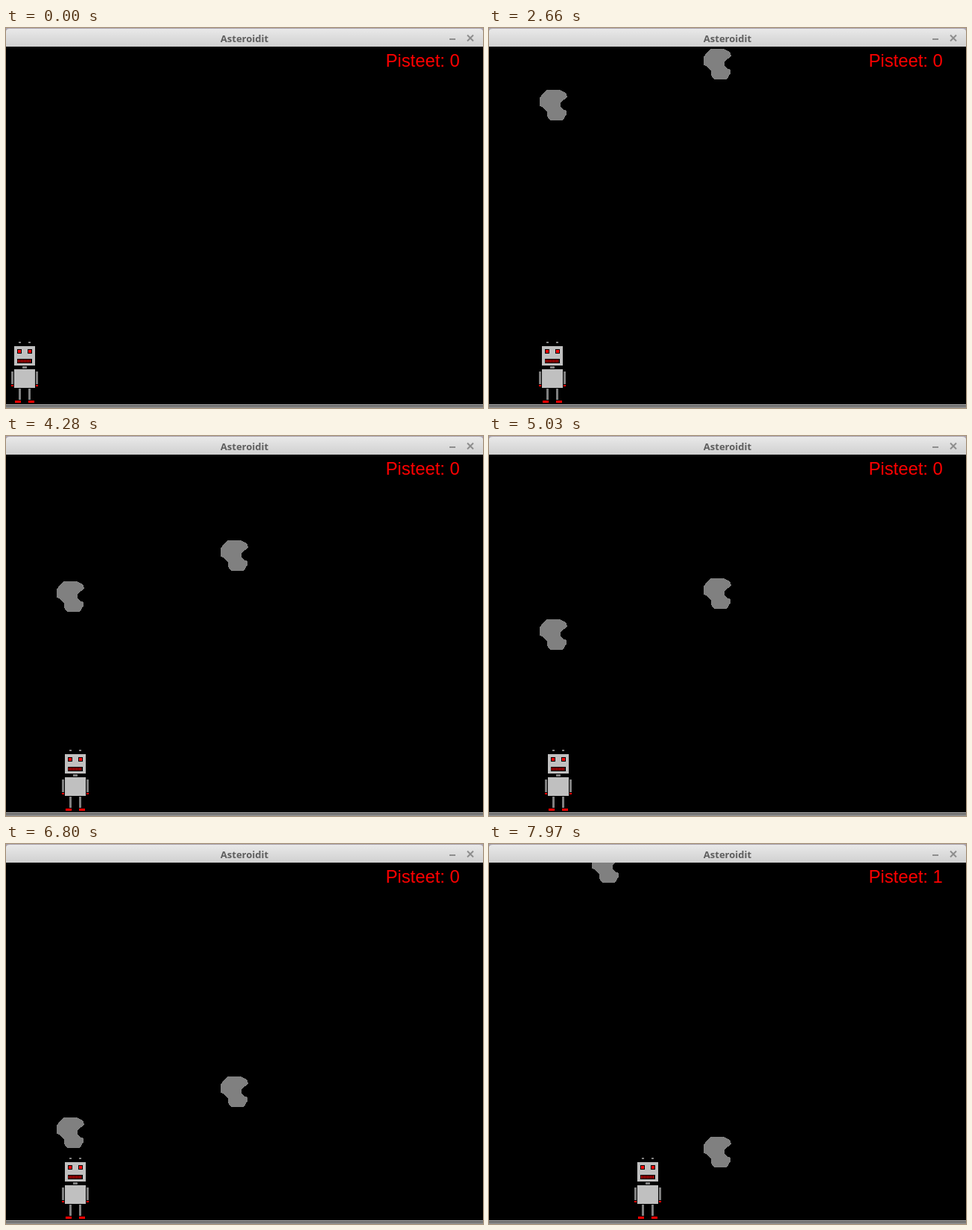
An HTML page that plays this animation: 640x510 px, repeating every 8000 ms.

```html
<!DOCTYPE html>
<html lang="fi">
<head>
<meta charset="utf-8">
<title>Asteroidit</title>
<style>
  html, body { margin: 0; height: 100%; overflow: hidden; background: #000; }
  svg { display: block; width: 640px; height: 510px; }
  .title { font: bold 13px "Open Sans", "Noto Sans", sans-serif; fill: #5e5e5e; }
  .score { font: 23.8px "Liberation Sans", Arial, sans-serif; fill: #f00; }
</style>
</head>
<body>
<svg viewBox="0 0 640 510">
  <defs>
    <linearGradient id="bar" x2="0" y2="1">
      <stop stop-color="#e9e9e9"/><stop offset="1" stop-color="#d0d0d0"/>
    </linearGradient>
    <linearGradient id="shadow" x2="0" y2="1">
      <stop stop-color="#5c5c5c"/><stop offset="1" stop-color="#989898"/>
    </linearGradient>
    <path id="rock" fill="#808080" d="M10 0H27L33 3 36 6 37 9 35 12 30 15 28 18V23L31 26 36 28V33L33 38 30 41H14L11 38 10 34V30L6 26 3 23 0 22V11L4 5 7 2Z"/>
  </defs>
  <rect width="640" height="510"/>

  <g shape-rendering="crispEdges">
    <use class="rock" href="#rock"/>
    <use class="rock" href="#rock"/>
    <use class="rock" href="#rock"/>
    <g id="robot">
      <path fill="#808080" d="M17 421h3v2h-3zM30 421h3v2h-3zM22 454h6v3h-6zM7 461h3v17h-3zM40 461h3v17h-3zM17 484h3v15h-3zM30 484h3v15h-3z"/>
      <path fill="#c0c0c0" d="M11 427h28v26h-28zM11 458h28v25h-28z"/>
      <path d="M15 431h6v6h-6zM29 431h6v6h-6zM15 444h20v6h-20z"/>
      <path fill="#f00" d="M16 432h4v4h-4zM30 432h4v4h-4zM7 479h3v2h-3zM40 479h3v2h-3zM12 500h8v3h-8zM30 500h8v3h-8z"/>
      <path stroke="#f00" stroke-width="4" stroke-dasharray="1" d="M16 447h18"/>
    </g>
  </g>

  <text class="score" x="509.5" y="52">Pisteet: <tspan id="points">0</tspan></text>

  <rect width="640" height="25" fill="#aaa2ae"/>
  <path fill="url(#bar)" d="M0 25V5Q0 1 5 1H635Q640 1 640 5V25Z"/>
  <text class="title" x="320" y="19" text-anchor="middle">Asteroidit</text>
  <path stroke="#8d8d8d" stroke-width="2" d="M595 15h8M619 9.5l8 8M627 9.5l-8 8"/>
  <rect y="505" width="640" height="1" fill="#b4b4b4"/>
  <rect y="506" width="640" height="4" fill="url(#shadow)"/>
</svg>
<script>
const LOOP = 8000, START = 1240, STEP = 44.57;
const HIT = 128;     // step at which the first rock is caught
const STRIDE = 12;   // robot pixels per step while a key is held

// Step and height of the first rock; the others fall in line with it
const fall = [[-1, -16], [0, -13], [32, 83], [68, 195], [103, 301], [125, 367], [151, 448]];
// Key presses: first step and distance walked
const presses = [[15, 60], [55, 8], [141, 120]];

const rocks = document.querySelectorAll(".rock");
const robot = document.getElementById("robot");
const points = document.getElementById("points");

const clamp = (v, low, high) => Math.min(high, Math.max(low, v));

function rockY(n) {
  const i = Math.max(1, fall.findIndex(([step]) => step >= n));
  const [a, from] = fall[i - 1], [b, to] = fall[i];
  return Math.round(from + (to - from) * (n - a) / (b - a));
}

function robotX(n) {
  return presses.reduce((x, [first, way]) => x + clamp((n - first) * STRIDE, 0, way), 0);
}

function move(el, x, y) {
  el.setAttribute("transform", `translate(${x} ${y})`);
}

function draw(now) {
  const t = now % LOOP;
  const n = t < START ? -1 : Math.min(151, Math.floor((t - START) / STEP + 0.35));
  const y = rockY(n);
  const hit = n >= HIT;
  move(rocks[0], 68, hit ? -100 : y);
  move(rocks[1], 288, y - 55);
  move(rocks[2], 138, y - 437);
  move(robot, robotX(n), 0);
  points.textContent = hit ? 1 : 0;
  requestAnimationFrame(draw);
}
draw(performance.now());
</script>
</body>
</html>
```
